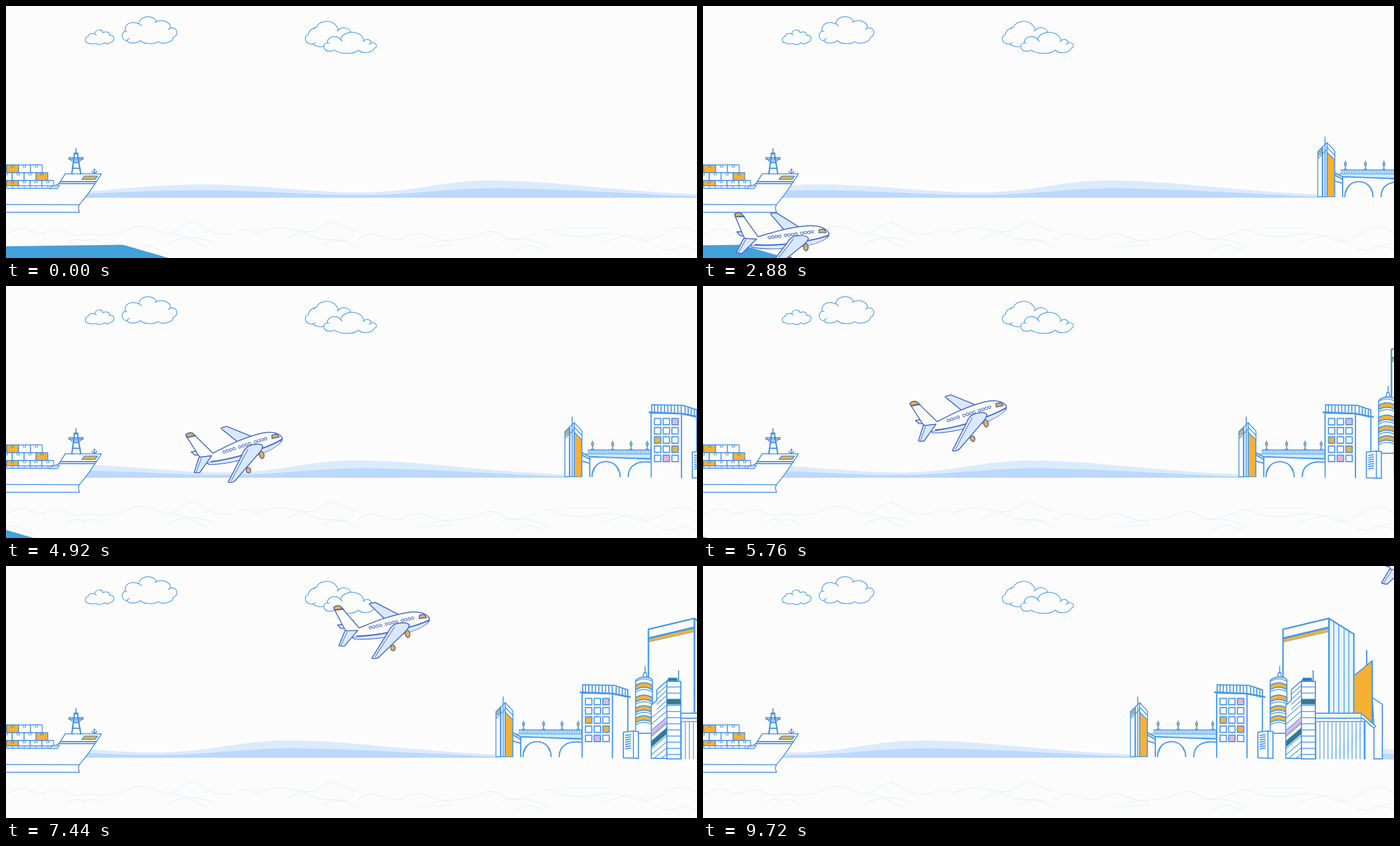
Recreate the animation shown at these times as an HTML page. Size 1239 px wide and 452 px high, loop 9.84 s.

```html
<!DOCTYPE html>
<html lang="en">
<head>
<meta charset="utf-8">
<title>Harbour</title>
<style>
html, body { margin: 0; width: 100%; height: 100%; overflow: hidden; background: #fcfcfc; }
svg { display: block; width: 100%; height: 100%; }
path { stroke-linejoin: round; stroke-linecap: round; }
</style>
</head>
<body>
<svg id="stage" viewBox="0 0 1239 452"></svg>
<script>
const LOOP = 9840, STEP = 120, SPEED = 0.0491, LAST = LOOP - STEP;
const BG = '#fcfcfc', ORANGE = '#f5b133', PINK = '#e3b4df', TEAL = '#35798f', CYAN = '#c6ecf6', GLASS = '#e8f5fa';

const path = (d, fill = 'none', width = '', stroke = '') =>
  `<path d="${d}" fill="${fill}"${width !== '' ? ` stroke-width="${width}"` : ''}${stroke ? ` stroke="${stroke}"` : ''}/>`;
const group = (stroke, width, content, extra = '') =>
  `<g fill="none" stroke="${stroke}" stroke-width="${width}" ${extra}>${content}</g>`;
const box = (x, y, w, h, fill = BG, width = '') => path(`M${x} ${y}h${w}v${h}h${-w}z`, fill, width);
const range = (n, f) => Array.from({ length: n }, (_, i) => f(i)).join('');

// Smooth curve through "x,y x,y ..." points
function curve(text) {
  const p = text.split(' ').map(s => s.split(',').map(Number));
  let d = 'M' + p[0];
  for (let i = 0; i < p.length - 1; i++) {
    const a = p[i - 1] || p[i], b = p[i], c = p[i + 1], e = p[i + 2] || c;
    d += `C${b[0] + (c[0] - a[0]) / 6} ${b[1] + (c[1] - a[1]) / 6} ${c[0] - (e[0] - b[0]) / 6} ${c[1] - (e[1] - b[1]) / 6} ${c[0]} ${c[1]}`;
  }
  return d;
}

function hills() {
  return path('M60 337C180 332 270 320 350 320C450 320 540 334 630 334.5C740 334 780 313 870 313C980 313 1100 333 1250 338V344H60Z', '#dbebfd')
    + path('M60 341C180 335 270 330.5 360 330.5C460 331 540 339 630 339C730 339 790 327 875 327C980 327 1100 336 1250 342V344H60Z', '#bdd8fd')
    + path('M1690 326L1720 330.5V347H1690Z', '#dbebfd')
    + path('M1690 335.5L1720 338V347H1690Z', '#bdd8fd');
}

function clouds() {
  return path('M147 66C141 65 140 56 147 55C147 50 155 48 159 50C161 41 172 41 174 48C180 44 187 48 186 53C195 50 197 64 187 65C184 69 178 68 176 66C171 70 165 70 161 67C156 69 150 68 147 66Z', BG)
    + path('M217 62C206 62 206 47 214 45C211 33 223 26 238 32C240 16 265 15 270 28C282 23 297 30 294 40C306 35 312 52 300 56C300 65 282 70 272 64C266 69 247 69 241 62C234 68 219 68 217 62Z', BG)
    + path('M214 45l3 1M238 32q4 1 5 4M270 28l-3 1M294 40l-3 2M217 62q1-3 5-4M159 50l3 2')
    + path('M570 72C563 75 553 71 550 68C537 70 532 55 542 51C544 42 550 39 557 38C562 24 590 22 596 43C604 35 618 40 618 48M557 38q-4 1-6 4M550 68q2 0 5-2M596 43l-2 2')
    + path('M573 79C568 75 569 67 576 66C576 54 594 51 600 60C603 44 637 41 642 62C649 57 657 63 654 67C664 63 668 74 660 76C656 85 638 86 632 79C624 87 600 87 588 79C584 82 576 82 573 79Z', BG)
    + path('M600 60l3 3M576 66l4 1M642 62l-2 2M654 67l-3 2');
}

const curves = list => list.map(s => path(curve(s))).join('');

const waves = () => curves([
  '0,410 30,399 60,408 92,401 125,412 148,408 165,411 200,408 238,395 275,404 295,409 333,389 375,407 400,409 430,401 455,408',
  '445,407 490,397 520,403 550,404 580,388 605,396 630,404',
  '500,417 535,407 560,417 598,421 630,430',
  '630,420 655,409 700,419 740,408 780,420 830,416 870,404 910,419 950,408 975,401 1000,411 1040,414 1080,408 1110,412 1150,422 1205,397 1239,407',
  '110,423 130,418 140,421 155,419 170,424', '285,428 320,416 340,424 362,431', '300,410 340,416 370,422',
  '740,432 775,430 798,430', '760,428 785,420 800,431', '913,437 940,430 968,440', '890,420 930,418 975,432',
  '1070,424 1120,411 1150,421', '1168,432 1190,438 1215,431 1239,437', '1000,398 1078,398', '565,429 590,419 610,422'
]);

function shore() {
  return group('#e9f2f5', 1.5, curves(['100,430 120,426 142,429', '238,432 262,432 290,445']))
    + path('M-2 431L195 428.5Q209 427.5 214 429.5L291 452H-2Z', '#41a2dc');
}

function ship() {
  const crate = (x, y, h, fill) => box(x, y, 21, h, fill) + path(`M${x + 8.5} ${y}v4h4v-4`, 'none', 1.1);
  return path('M-5 327H84L97 316L106 301H171C158 322 143 343 135 352C129 358 129 364 132 370H-5Z', BG, 1.5)
    + path('M-5 356L131 356.5')
    + path('M97 315H162M95 318.5H159', 'none', 1.8)
    + path('M141 305H164L160 311H136Z', ORANGE, 1.5)
    + path('M83 321.5H96L92 327.5H79Z', BG)
    + path('M82 324H93', 'none', 0.9)
    + range(4, i => crate(i * 21.3 - 20, 285, 14, i === 1 ? ORANGE : BG))
    + range(4, i => crate(i * 21.3 - 10, 299, 14, i === 3 ? ORANGE : BG))
    + range(5, i => crate(i * 21.1 - 20, 313, 9.5, i === 1 ? ORANGE : BG))
    + path('M0 322.5H82' + range(8, i => `M${i * 10.6 + 1} 322.5v4.5`), 'none', 1)
    + path('M123 264L118 301M128 264L134 301', 'none', 2.3)
    + path('M125.5 256V266', 'none', 1.8)
    + path('M121 281H130.500M120 291H132.5M122 264H129', 'none', 2)
    + path('M112 272H139M112 275H139M113 272L118 278H133L138 272' + range(6, i => `M${115 + i * 4} 272v3`), 'none', 1.4)
    + path('M158.5 292V301M154 296L156 299H161L163 296M157 294H160', 'none', 1.5);
}

function tallTower() {
  return path('M1040 300V113.5L1122 94V300Z', BG)
    + path('M1122 94L1167 122V300H1122Z', GLASS)
    + path('M1040 131L1122 111.5V118L1040 136.5Z', ORANGE, 0.8)
    + path('M1040 129.5L1122 110', 'none', 3)
    + path('M1131 100V264M1140 105V264M1149.5 111V264M1158 116V264', 'none', 1.5)
    + path('M1040 204V113.5L1122 94L1167 122V265M1122.5 94V265', 'none', 2.6);
}

function backBlocks() {
  return path('M1167 197L1200 170V290H1167Z', ORANGE)
    + path('M1190 152V177M1200 170V285', 'none', 2.4)
    + path('M1200 236L1218 248V346H1203V286Z', BG);
}

function roundTower() {
  const arc = y => `M1017 ${y}Q1032 ${y - 9} 1047 ${y}`;
  return path('M1017 300V207Q1018 201 1032 199Q1046 200 1047 205V300Z', BG, 1.8)
    + [214, 236, 255, 273].map(y =>
      path(`${arc(y)}V${y + 8}Q1032 ${y - 1} 1017 ${y + 8}Z`, ORANGE) + path(arc(y + 12), 'none', 1.4)).join('')
    + path(arc(207), 'none', 1.4)
    + path('M1034 180V192M1030 199L1032 191H1036L1037 199', 'none', 1.7);
}

function glassHall() {
  return path('M1098 264H1180L1206 287L1203 291V346H1098Z', BG, 0)
    + path('M1120 346L1185 282V300L1150 346Z', GLASS, 0)
    + path('M1098 264H1180L1206 287L1203 291L1183 273H1098Z', GLASS, 1.8)
    + path('M1098 279H1186M1180 265V279' + range(13, i => `M${1099 + i * 7.2} 279V346`), 'none', 1.3)
    + path('M1187 277V346M1203 290V346', 'none', 1.8);
}

function stripedTower() {
  const slant = (y, h, fill) => path(`M1073 ${y}L1045 ${y + 24}v${h}L1073 ${y + h}Z`, fill, 1);
  return path('M1045 345V250L1055 241V222L1073 206V345Z', BG, 1.8)
    + path('M1073 207H1098V346H1073Z', BG, 2)
    + range(4, i => path(`M1073 ${214 + i * 9}L1055 ${230 + i * 9}`, 'none', 1.2))
    + range(7, i => path(`M1073 ${249 + i * 11}l-28 24`, 'none', 1.2))
    + path('M1073 326L1050 345M1073 337L1063 345', 'none', 1.2)
    + slant(271, 9, PINK) + slant(290, 11, TEAL)
    + range(12, i => path(`M1073 ${217 + i * 11}H1098`, 'none', 1.3))
    + box(1073, 239, 25, 9, TEAL, 1)
    + path('M1076 201H1091L1092 206H1074Z', TEAL, 1.5)
    + path('M1094 188V207', 'none', 2);
}

function smallBlock() {
  return path('M995 344V298L1013 296L1022 297V345Z', BG, 2)
    + path('M1013 296V345' + range(7, i => `M999 ${304 + i * 4}L1008 ${302.5 + i * 4}`), 'none', 1.8);
}

function office() {
  const tint = { 2: PINK, 6: ORANGE, 11: ORANGE, 13: PINK };
  return path('M921 343V229H976L1003 236V344Z', BG, 0)
    + path('M921 343V229M975.5 231V344M1003 237V298', 'none', 2.2)
    + path('M922 228V213L978 214L1003 222V235L976 229Z', BG, 2.2)
    + path(range(9, i => `M${927 + i * 6} 214V228`) + range(4, i => `M${982 + i * 5.5} ${216 + i * 1.8}V${231 + i * 1.3}`), 'none', 1.9)
    + path('M918 226.5L976 229L1007 235', 'none', 3)
    + range(15, i => box(927 + i % 3 * 15.6, 237.5 + Math.floor(i / 3) * 16.5, 11.5, 11.5, tint[i] || BG, 1.9));
}

function bridge() {
  const lamp = x => path(`M${x} 286v7M${x - 2} 293h4`, 'none', 1.9)
    + `<ellipse cx="${x}" cy="283.5" rx="2" ry="3" fill="${ORANGE}" stroke-width="1.3"/>`
    + path(`M${x} 278v2`, 'none', 1.5);
  return path('M797 299L810 302H920V343H797Z', BG, 0)
    + path('M803 301L920 301.5V309L811 307Z', CYAN, 1)
    + path('M797 299L810 306L920 310.5M797 303L811 311', 'none', 2.1)
    + path('M808 294H920' + range(38, i => `M${808.5 + i * 3} 294v6.5`), 'none', 1.3)
    + path('M797 314L811 318M811 307V342M815 342C815 306 865 306 865.5 342M880 342C880 322 896 313 920 316', 'none', 2.2)
    + path('M818 334C821 309 858 309 862 332', 'none', 0.9)
    + [816, 852, 885, 914].map(lamp).join('');
}

function gateTower() {
  return path('M766.5 342V261L783 245L797 260V342Z', BG, 1.6)
    + path('M767 263L775 255V262L767 268.5Z', ORANGE, 1.2)
    + path('M784 263L796 275V342H784Z', ORANGE, 0.8)
    + path('M775 254V342', 'none', 2.6)
    + path('M779.5 235V342M783 245V342', 'none', 1.8)
    + path('M783 253L797 268M783 262L797 276M767 273L783 257', 'none', 1.6);
}

// Drawn around the middle of the window row
function plane() {
  const blue = '#d9e8ff';
  return path('M893 13Q889 9 894 9.5L902 9L942 36L915 40Z', blue)
    + path('M830 41H838L848 50L836 48Z', blue)
    + path('M827 9Q832 5 839 8L868 51C890 45 920 36 955 34C972 33 986 37 993 45Q997 49 993 55C980 65 950 72 920 73C895 74 872 73 856 69L842 50L828 13Z', BG)
    + path('M856 66C890 68 930 67 962 60Q980 57 994 53C985 66 950 72 920 73C895 74 872 73 856 69Z', blue, 0.8)
    + path('M862 65C890 68 930 66 960 60Q980 57 994 52', 'none', 2.2)
    + path('M827 9Q832 5 839 8L843 13L829 14Z', ORANGE)
    + path('M828 14L844 14', 'none', 2.2)
    + path('M978 41H987L990 47H977Z', ORANGE)
    + range(12, i => {
      const x = 888 + i * 6.2 + Math.floor(i / 4) * 4.5;
      return `<circle cx="${x}" cy="${53 - (x - 887) * 0.103}" r="2.3" fill="${BG}" stroke-width="1.1"/>`;
    })
    + path('M842 53L865 55L838 80Q832 80 828 78Z', blue)
    + path('M846 55L832 78', 'none', 1)
    + `<ellipse cx="953" cy="72" rx="4" ry="6.5" fill="${ORANGE}"/><ellipse cx="924" cy="94" rx="4" ry="5" fill="${ORANGE}"/>`
    + path('M919 64Q927 50 942 51Q956 51 958 57Q955 64 947 69L896 108Q889 110 884 107.5Z', blue)
    + path('M931 57L890 106', 'none', 1);
}

const stage = document.getElementById('stage');
stage.innerHTML =
  `<g class="shift"><g transform="translate(-477)">${hills()}</g></g>`
  + group('#3f97f3', 1.25, clouds())
  + group('#e9f2f5', 1.5, waves())
  + group('#3f8be2', 1.35, ship())
  + `<g class="shift"><g transform="translate(-477)">${shore()}</g></g>`
  + group('#4497ec', 2, tallTower() + backBlocks() + roundTower() + glassHall() + stripedTower()
    + office() + smallBlock() + bridge() + gateTower(), 'class="shift"')
  + group('#4569c6', 1.7, `<g transform="translate(-926 -49)">${plane()}</g>`, 'id="plane"');

// time, x, y, angle
const flight = [
  [0, -223, 430, -5], [1920, 30.5, 427, -5.7], [3840, 283.5, 375.5, -11], [4920, 427.5, 286, -17.7],
  [6480, 522, 181, -17.8], [7560, 716, 94, -12], [8400, 926, 49, -5.9], [LAST, 1315, 3, -5]
];

const slope = (i, k) => (flight[i + 1][k] - flight[i][k]) / (flight[i + 1][0] - flight[i][0]);

function tangent(i, k) {
  if (i === 0) return slope(0, k);
  if (i === flight.length - 1) return slope(i - 1, k);
  const a = slope(i - 1, k), b = slope(i, k);
  return a * b > 0 ? 2 * a * b / (a + b) : 0;
}

// Monotone cubic through the flight points
function sample(t, k) {
  let i = 0;
  while (i < flight.length - 2 && t > flight[i + 1][0]) i++;
  const h = flight[i + 1][0] - flight[i][0], u = (t - flight[i][0]) / h, v = 1 - u;
  return flight[i][k] * v * v * (1 + 2 * u) + flight[i + 1][k] * u * u * (3 - 2 * u)
    + h * u * v * (tangent(i, k) * v - tangent(i + 1, k) * u);
}

const shifted = document.querySelectorAll('.shift');
const craft = document.getElementById('plane');
const start = performance.now();

function draw(now) {
  const t = Math.floor((Math.max(0, now - start) % LOOP) / STEP) * STEP;
  const dx = SPEED * (LAST - t);
  shifted.forEach(g => g.setAttribute('transform', `translate(${dx})`));
  craft.setAttribute('transform', `translate(${sample(t, 1)} ${sample(t, 2)}) rotate(${sample(t, 3) + 5.9})`);
  requestAnimationFrame(draw);
}
draw(start);
</script>
</body>
</html>
```
